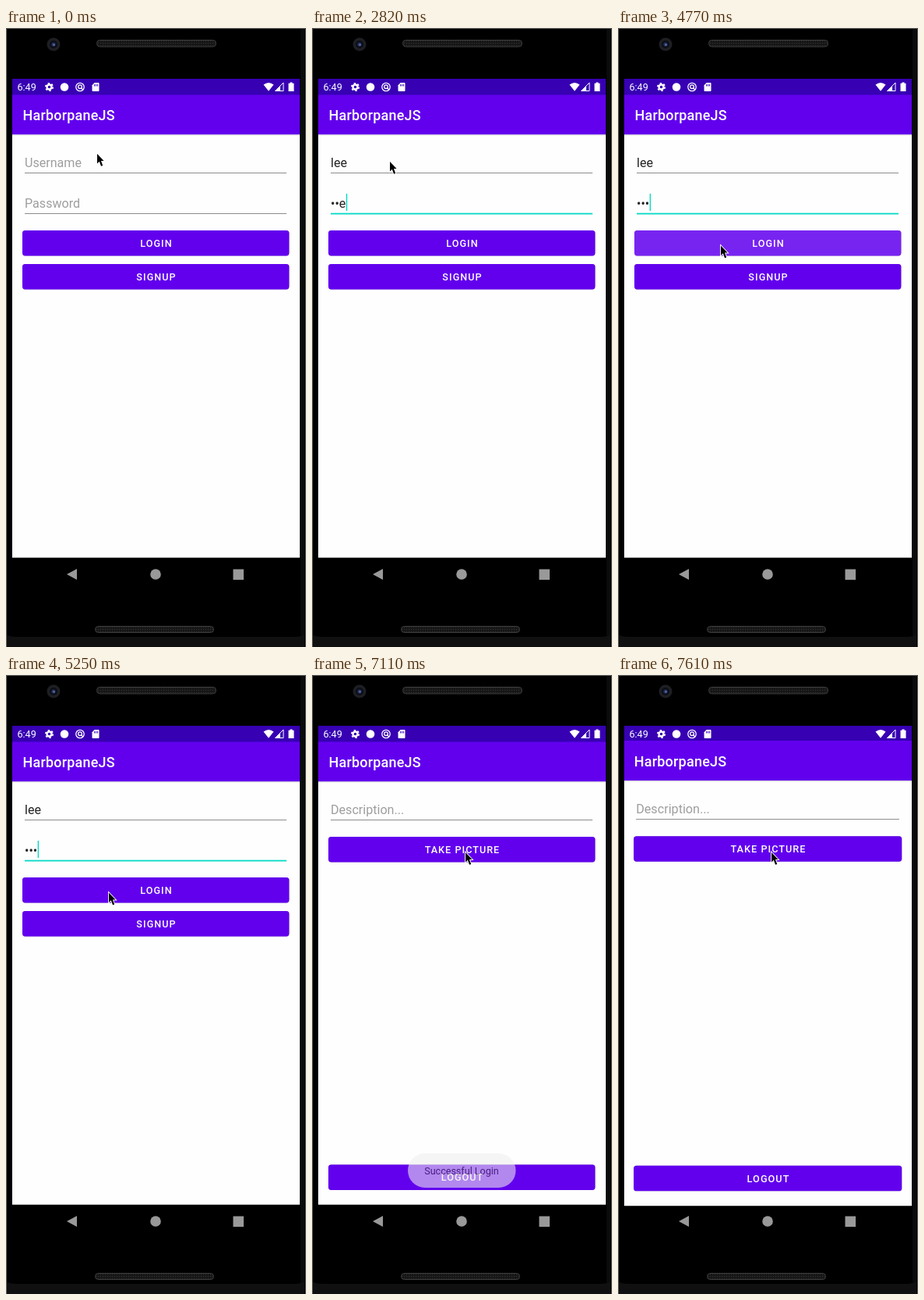
An HTML page for the animation above (8000 ms loop, 385 by 792 pixels).

```html
<!DOCTYPE html>
<html lang="en">
<head>
<meta charset="utf-8">
<title>Login demo</title>
<style>
  html, body { margin: 0; width: 100%; height: 100%; overflow: hidden; background: #000; }
  svg { display: block; width: 100%; height: 100%; font-family: Roboto, sans-serif; }
  .window { transform-origin: 192.5px 371.5px; }
  .title { font-size: 17.95px; font-weight: 500; letter-spacing: .22px; fill: #fff; }
  .field { font-size: 16.1px; fill: #222; }
  .hint { fill: #9e9e9e; }
  .button { fill: #6200ee; filter: drop-shadow(0 .8px .7px #0004); }
  .label { font-size: 12.57px; font-weight: 500; letter-spacing: .085em; fill: #fff; text-anchor: middle; }
  .line { fill: #8c8c8c; }
  .line.focus { fill: #03dac5; }
  .toast { font-size: 12.57px; text-anchor: middle; }
</style>
</head>
<body>
<svg viewBox="0 0 385 792">
  <defs>
    <clipPath id="screen"><rect x="8" y="65" width="369" height="655"/></clipPath>
    <pattern id="mesh" width="3" height="3" patternUnits="userSpaceOnUse">
      <rect width="3" height="3" fill="#151515"/><circle cx="1.5" cy="1.5" r=".8" fill="#303030"/>
    </pattern>
    <g id="chrome">
      <rect x="8" y="65" width="369" height="612.7" fill="#fefefe"/>
      <rect x="8" y="136" width="369" height="1.5" opacity=".12"/>
      <rect x="8" y="85" width="369" height="51.2" fill="#6200ee"/>
      <rect x="8" y="65" width="369" height="20.5" fill="#3700b3"/>
      <text class="title" x="21.5" y="118">HarborpaneJS</text>
    </g>
  </defs>

  <!-- phone body -->
  <rect width="385" height="792"/>
  <path d="M0 792V776Q4 779 14 779H371Q380 779 383 774V792Z" fill="#101010"/>
  <rect x="378" y="1" width="5" height="776" fill="#0b0b0b"/>
  <path d="M.5 792V.5H384.5V792" fill="none" stroke="#666"/>
  <circle cx="61" cy="21" r="8.5" fill="#1e1f23"/>
  <circle cx="61" cy="21" r="5" fill="#0c0e18"/>
  <circle cx="61" cy="21" r="2.6" fill="#27345f"/>
  <circle cx="61.5" cy="21.5" r="1" fill="#7d8fc8"/>
  <g fill="url(#mesh)" stroke="#3b3b3b">
    <rect x="116.5" y="15.5" width="153" height="8.5" rx="4"/>
    <rect x="114.5" y="765.5" width="152" height="8" rx="4"/>
  </g>

  <g clip-path="url(#screen)">
    <g id="login" class="window">
      <use href="#chrome"/>
      <text class="field" x="24" y="177.5" id="user"></text>
      <text class="field" x="24" y="229.5" id="pass"></text>
      <rect class="line" id="userLine" x="24" width="336"/>
      <rect class="line" id="passLine" x="24" width="336"/>
      <rect id="caret" width="1.4" height="22" fill="#03dac5"/>
      <g id="loginButtons"></g>
    </g>
    <g id="post" class="window">
      <use href="#chrome"/>
      <text class="field hint" x="24" y="177.5">Description...</text>
      <rect class="line" x="24" y="185" width="336" height="1"/>
      <g id="postButtons"></g>
    </g>
  </g>

  <!-- system bars -->
  <g fill="#fff">
    <text x="14.5" y="80.3" font-size="12.57">6:49</text>
    <g fill="none" stroke="#fff">
      <circle cx="55.5" cy="75.5" r="3" stroke-width="2.4"/>
      <circle cx="55.5" cy="75.5" r="4.7" stroke-width="1.7" stroke-dasharray="2.4 2.52"/>
      <g stroke-width="1.3">
        <circle cx="95" cy="75.5" r="5.2"/><circle cx="95" cy="75.2" r="2.3"/><path d="M96.5 76.8L99 79.3"/>
      </g>
      <path d="M356 70V80.5H345.5Z"/>
    </g>
    <circle cx="75" cy="75.5" r="5.3"/>
    <path d="M113.6 70H118.6Q119.5 70 119.5 71V80Q119.5 81 118.5 81H111.5Q110.5 81 110.5 80V73.2Z"/>
    <path d="M113.5 72V74.5M115.5 72V74.5M117.5 72V74.5" stroke="#3700b3"/>
    <path d="M330.5 72.5Q337 67.5 343.5 72.5L337 80.7Z"/>
    <path d="M352 74V80.5H345.5Z"/>
    <path d="M364.5 69.5H367.5V70.7H369.5V81H362.5V70.7H364.5Z"/>
  </g>
  <g fill="#999">
    <path d="M78 699L91 692V706Z"/><circle cx="192" cy="699" r="6.8"/>
    <rect x="291.5" y="692.5" width="13.5" height="13.5"/>
  </g>

  <g id="toast" class="toast">
    <rect x="123" y="612" width="138.5" height="44" rx="22" fill="#efefef"/>
    <text x="192" y="639.3" fill="#333">Successful Login</text>
  </g>
  <path id="cursor" d="M0 0V12.4L2.8 9.8 5 15.8 7.2 14.9 5 9.1H8.6Z" stroke="#fff" stroke-width="1.8" paint-order="stroke"/>
</svg>

<script>
const $ = id => document.getElementById(id);
const LOOP = 8000, NAME = 'lee', KEY_GAP = 135, MASK_DELAY = 1520;
const FOCUS_USER = 700, TYPE_USER = 1690, FOCUS_PASS = 2240, TYPE_PASS = 2550;
const TAP_LOGIN = 4650, OPEN_POST = 5370, FADE_TOAST = 6950, TAP_PICTURE = 7250, OPEN_CAMERA = 7610;
const LAST_KEY = TYPE_PASS + (NAME.length - 1) * KEY_GAP;

const clamp = x => Math.min(1, Math.max(0, x));
const mix = (a, b, p) => a + (b - a) * p;
const easeOut = p => 1 - (1 - p) ** 3;
const smooth = p => p * p * (3 - 2 * p);
// Progress 0..1 in equal jumps, the first one right at the start.
const stepped = (t, start, gap, count) => clamp((Math.floor((t - start) / gap) + 1) / count);

const moves = [
  { start: 150, gap: 150, count: 2, to: [100, 171], ease: easeOut },
  { start: 3470, gap: 145, count: 7, to: [132, 278.5], ease: easeOut },
  { start: 6420, gap: 135, count: 3, to: [194.5, 202], ease: smooth },
  { start: 6830, gap: 140, count: 3, to: [197, 227], ease: easeOut }
];

function cursorAt(t) {
  return moves.reduce((from, { start, gap, count, to, ease }) => {
    const p = ease(stepped(t, start, gap, count));
    return from.map((v, i) => mix(v, to[i], p));
  }, [117, 161]);
}

const typed = (t, start) => NAME.slice(0, Math.round(stepped(t, start, KEY_GAP, NAME.length) * NAME.length));

function masked(text, t) {
  const shown = t < LAST_KEY + MASK_DELAY ? 1 : 0;
  return text && '•'.repeat(text.length - shown) + text.slice(text.length - shown);
}

// The blink restarts after each focus and burst of typing.
function caretOn(t) {
  const restart = [FOCUS_USER + 150, TYPE_USER, FOCUS_PASS, TYPE_PASS, LAST_KEY].findLast(r => r <= t);
  return restart !== undefined && (t - restart) % 970 < 525;
}

function button(label, y, ripple) {
  const box = `x="21" y="${y}" width="342.4" height="32.4" rx="3.6"`;
  const wave = ripple ? `<clipPath id="${ripple.id}Clip"><rect ${box}/></clipPath>
    <g clip-path="url(#${ripple.id}Clip)"><circle id="${ripple.id}" cx="${ripple.x}" cy="${ripple.y}" fill="#fff"/></g>` : '';
  return `<rect class="button" ${box}/>${wave}<text class="label" x="193" y="${y + 20.8}">${label}</text>`;
}
$('loginButtons').innerHTML = button('LOGIN', 259, { id: 'loginRipple', x: 132, y: 278 }) + button('SIGNUP', 302);
$('postButtons').innerHTML = button('TAKE PICTURE', 207, { id: 'postRipple', x: 197, y: 227 }) + button('LOGOUT', 626.5);

function drawField(id, hint, value, lineY, focused) {
  const text = $(id), line = $(id + 'Line');
  text.textContent = value || hint;
  text.classList.toggle('hint', !value);
  line.classList.toggle('focus', focused);
  line.setAttribute('y', focused ? lineY - .3 : lineY);
  line.setAttribute('height', focused ? 1.8 : 1);
  if (focused) {
    $('caret').setAttribute('x', 24.4 + (value ? text.getComputedTextLength() : 0));
    $('caret').setAttribute('y', lineY - 25);
  }
}

function drawWindow(id, scale, opacity) {
  $(id).style.transform = `scale(${scale})`;
  $(id).style.opacity = opacity;
}

function drawRipple(id, age) {
  $(id).setAttribute('r', age < 0 ? 0 : 90 + age * 2);
  $(id).setAttribute('opacity', .14 * clamp((360 - age) / 120));
}

function draw(t) {
  drawField('user', 'Username', typed(t, TYPE_USER), 185, t >= FOCUS_USER && t < FOCUS_PASS);
  drawField('pass', 'Password', masked(typed(t, TYPE_PASS), t), 237, t >= FOCUS_PASS);
  $('caret').setAttribute('opacity', caretOn(t) ? 1 : 0);

  const opened = stepped(t, OPEN_POST, 120, 2) ** 2;
  const leaving = t >= OPEN_CAMERA ? .005 : 0;
  drawWindow('login', 1 + .18 * opened, opened < 1 ? 1 : 0);
  drawWindow('post', mix(.85, 1, opened) + leaving, opened);
  drawRipple('loginRipple', t - TAP_LOGIN);
  drawRipple('postRipple', t - TAP_PICTURE);

  const fade = stepped(t, FADE_TOAST, 140, 4);
  $('toast').setAttribute('opacity', opened < 1 ? 0 : .88 * (1 - fade ** 1.5));
  $('cursor').setAttribute('transform', `translate(${cursorAt(t)})`);
}

const start = performance.now();
function tick() {
  draw((performance.now() - start) % LOOP);
  requestAnimationFrame(tick);
}
tick();
</script>
</body>
</html>
```
